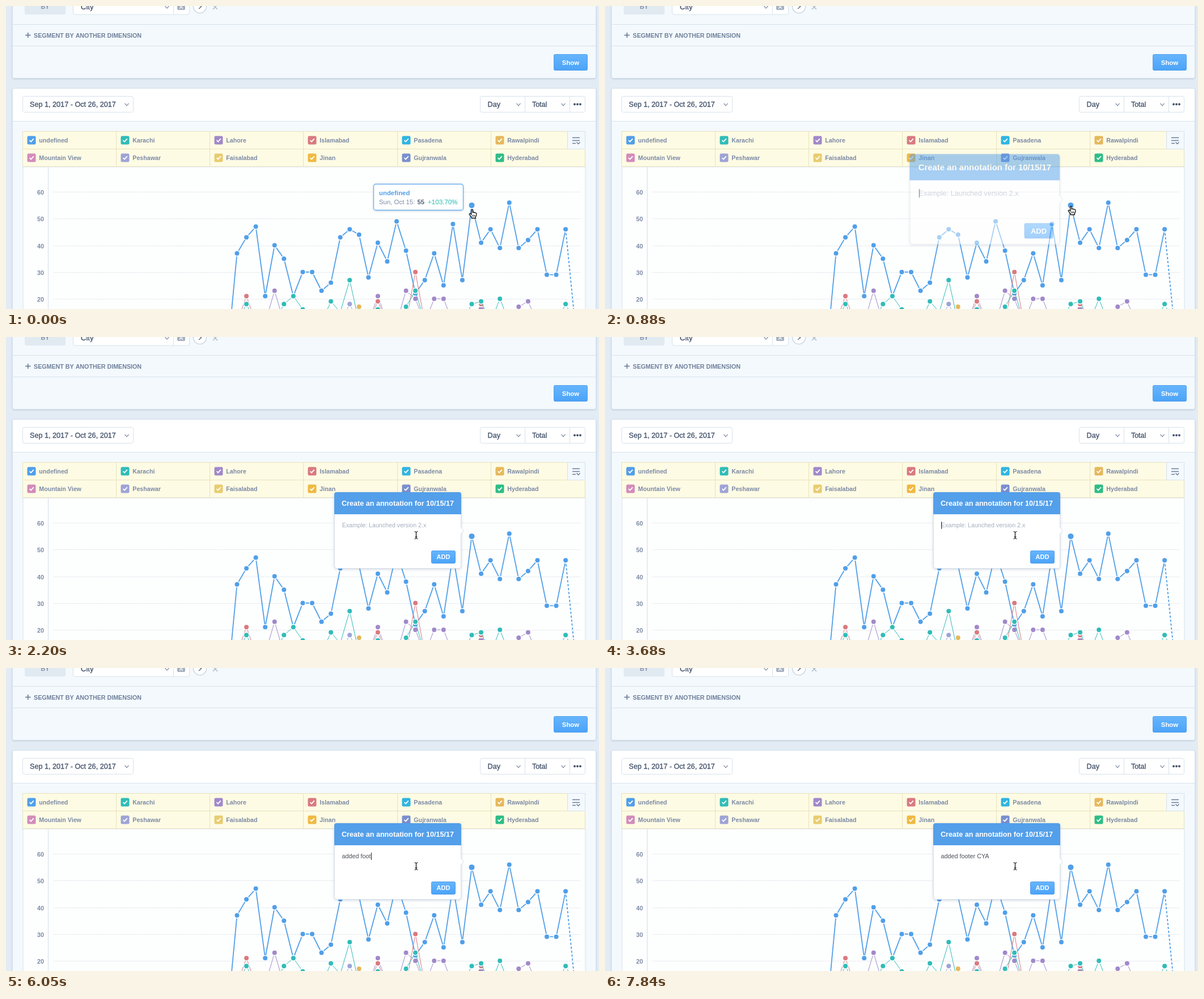
Write an HTML page with a canvas that moves like this. It is 1046x535 px and loops after 7.99 s.

```html
<!DOCTYPE html>
<html lang="en">
<head>
<meta charset="utf-8">
<title>Chart annotation</title>
<style>
html, body { margin: 0; width: 100%; height: 100%; overflow: hidden; background: #e3ecf5; }
canvas { display: block; }
</style>
</head>
<body>
<canvas id="stage" width="1046" height="535"></canvas>
<script>
const stage = document.getElementById('stage');
const layer = stage.cloneNode();
let ctx = stage.getContext('2d');
const LOOP = 7990, TICK = 148;
const BLUE = '#509fe9', INK = '#45546c', MUTED = '#7c8aa5', EDGE = '#d7e2ec', PANEL = '#f3f9fd';

function text(str, x, y, size, color, weight = 700, align = 'left') {
  ctx.font = `${weight === 700 ? 700 : 400} ${size}px "Liberation Sans", Arial, sans-serif`;
  ctx.textAlign = align;
  ctx.fillStyle = color;
  ctx.fillText(str, x, y);
  if (weight === 500) {
    ctx.strokeStyle = color;
    ctx.lineWidth = 0.35;
    ctx.strokeText(str, x, y);
  }
  return ctx.measureText(str).width;
}

function line(points, color, width = 1, dash = []) {
  ctx.beginPath();
  points.forEach(([x, y]) => ctx.lineTo(x, y));
  ctx.strokeStyle = color;
  ctx.lineWidth = width;
  ctx.setLineDash(dash);
  ctx.stroke();
  ctx.setLineDash([]);
}

function box(x, y, w, h, fill, border, radius = 0, shadow = 0, borderWidth = 1) {
  ctx.beginPath();
  ctx.roundRect(x, y, w, h, radius);
  ctx.save();
  if (shadow) {
    ctx.shadowColor = 'rgba(60,90,130,.3)';
    ctx.shadowBlur = shadow;
    ctx.shadowOffsetY = 1;
  }
  ctx.fillStyle = fill;
  ctx.fill();
  ctx.restore();
  if (border) {
    ctx.strokeStyle = border;
    ctx.lineWidth = borderWidth;
    ctx.stroke();
  }
}

function disc(x, y, r, fill, border, width = 1) {
  ctx.beginPath();
  ctx.arc(x, y, r, 0, 7);
  if (border) {
    ctx.strokeStyle = border;
    ctx.lineWidth = width;
    ctx.stroke();
  }
  ctx.fillStyle = fill;
  ctx.fill();
}

const chevron = (x, y) => line([[x - 3.5, y - 2], [x, y + 2], [x + 3.5, y - 2]], '#8a97aa', 1.3);

function button(x, y, w, h, label, size) {
  const g = ctx.createLinearGradient(0, y, 0, y + h);
  g.addColorStop(0, '#66b5fd');
  g.addColorStop(1, '#4ba3f8');
  box(x, y, w, h, g, '#519fea', 2);
  text(label, x + w / 2, y + h / 2 + size * 0.36, size, '#fff', 700, 'center');
}

function drawQuery() {
  box(11.5, -10, 1029, 137.5, PANEL, EDGE, 3, 3);
  line([[12, 32.5], [1040, 32.5]], EDGE);
  line([[12, 70.5], [1040, 70.5]], EDGE);
  box(33, -10, 72, 25, '#e1e9f1', null, 3);
  text('BY', 69, 5, 10.7, '#8291aa', 700, 'center');
  box(118.5, -10, 205, 25, '#fff', EDGE, 3);
  line([[295.5, 0], [295.5, 15]], EDGE);
  text('City', 132, 5.5, 13, INK, 500);
  chevron(284, 2);
  box(302, -6, 14, 13, '#a5b0c0', null, 2);
  text('A', 309, 5, 9.5, '#fff', 700, 'center');
  disc(342, 1, 11, '#fff', '#bac7d6', 2);
  line([[340, -3], [344.5, 1], [340, 5]], '#62718a', 1.5);
  line([[365, -2], [373, 6]], '#b3bdca', 1.6);
  line([[373, -2], [365, 6]], '#b3bdca', 1.6);
  line([[34, 51.5], [43.5, 51.5]], '#6f7f9a', 1.7);
  line([[38.75, 47], [38.75, 56]], '#6f7f9a', 1.7);
  text('SEGMENT BY ANOTHER DIMENSION', 49, 55.5, 10.7, '#6f7f9a');
  button(966.5, 85.5, 59, 28, 'Show', 11.4);
}

const LEGEND = [
  ['undefined', '#509fe9'], ['Karachi', '#30bcb8'], ['Lahore', '#a189ca'],
  ['Islamabad', '#d97a80'], ['Pasadena', '#2fb5e2'], ['Rawalpindi', '#e6b85c'],
  ['Mountain View', '#d38cba'], ['Peshawar', '#9ea3d6'], ['Faisalabad', '#e8cc70'],
  ['Jinan', '#f0b942'], ['Gujranwala', '#7a8fd0'], ['Hyderabad', '#2ebd86']
];

function drawReport() {
  box(11.5, 145.5, 1029, 420, PANEL, EDGE, 3, 3);
  box(12, 146, 1028, 57, '#fff', null, 3);
  line([[12, 203.5], [1040, 203.5]], EDGE);
  box(29.5, 159.5, 195, 28, '#fff', EDGE, 3);
  text('Sep 1, 2017 - Oct 26, 2017', 42, 178, 12.65, INK, 500);
  chevron(213, 174);
  box(836.5, 159.5, 185, 28, '#fff', EDGE, 3);
  line([[915.5, 160], [915.5, 187]], EDGE);
  line([[994.5, 160], [994.5, 187]], EDGE);
  text('Day', 849.5, 178, 12.65, INK, 500);
  text('Total', 928, 178, 12.4, INK, 500);
  chevron(904, 174);
  chevron(983, 174);
  for (let i = 0; i < 3; i++) disc(1003 + 5 * i, 173.5, 2, INK);

  box(30, 284, 992, 260, '#fdfefe', EDGE);
  const rule = '#e6e1bd';
  box(29.5, 221.5, 992, 62, '#fefbe4', rule);
  line([[30, 252.5], [1021, 252.5]], rule);
  LEGEND.forEach(([name, color], i) => {
    const x = Math.round(29.7 + 165.2 * (i % 6)), y = i < 6 ? 237 : 268;
    if (i % 6) line([[x - 0.5, y - 15], [x - 0.5, y + 15]], rule);
    box(x + 7.5, y - 7.5, 15, 15, color, null, 2.5);
    line([[x + 11.5, y], [x + 14, y + 2.7], [x + 18.8, y - 2.7]], '#fff', 1.8);
    text(name, x + 28.3, y + 4, 10.7, MUTED);
  });
  box(990.5, 221.5, 31, 31, PANEL, EDGE);
  for (let i = 0; i < 3; i++) line([[999, 232.5 + 5 * i], [i < 2 ? 1012 : 1005, 232.5 + 5 * i]], '#6b7a94', 1.5);
  line([[1006.5, 240.5], [1009.5, 243.5], [1012.5, 240.5]], '#6b7a94', 1.5);
}

const px = day => 407.5 + 16.56 * day;
const py = value => 611.2 - 4.715 * value;
const PEAK = 25, DAYS = 36, UNSEEN = 11;
const VISITS = [37, 43, 47, 21, 40, 35, 21, 30, 30, 23, 26, 43, 46, 44, 28, 41, 34, 49,
  38, 22, 27, 37, 25, 48, 27, 55, 41, 46, 39, 56, 39, 42, 46, 29, 29, 46];
// Minor cities need only the days that rise into view.
const MINOR = [
  ['#e6b85c', { 13: 17 }],
  ['#9ea3d6', { 12: 18 }],
  ['#a189ca', { 4: 23, 15: 21, 18: 23, 19: 20, 21: 20, 22: 20, 26: 16, 30: 17, 31: 19 }],
  ['#d97a80', { 1: 21, 15: 19, 19: 30, 26: 18 }],
  ['#30bcb8', { 1: 18, 5: 18, 6: 21, 7: 16, 10: 19, 11: 15, 12: 27, 15: 16, 18: 17, 19: 23,
    25: 18, 26: 19, 28: 20, 35: 18 }]
];

function drawSeries(color, values, width, before) {
  const points = Array.from({ length: DAYS }, (_, day) => [px(day), py(values[day] ?? UNSEEN)]);
  line([[px(-1), py(before)], ...points], color, width);
  line([points[DAYS - 1], [px(DAYS), py(UNSEEN)]], color, width, [4, 3]);
  points.forEach(([x, y], day) => {
    if (y < 545) disc(x, y, values === VISITS && day === PEAK ? 5 : 4, color, '#fff', 3);
  });
}

function drawChart() {
  line([[74.5, 284], [74.5, 535]], '#d3deea');
  for (let v = 20; v <= 60; v += 10) {
    const y = Math.round(py(v)) + 0.5;
    line([[84, y], [1013, y]], '#dfe4ea', 1, [2, 1]);
    text(v, 67, y + 4.5, 10.7, MUTED, 700, 'right');
  }
  drawSeries(BLUE, VISITS, 1.8, 0);
  MINOR.forEach(([color, values]) => drawSeries(color, values, 1, UNSEEN));
}

function drawTooltip() {
  box(648.5, 314.5, 158, 46, '#fff', '#6bb0ee', 4, 4, 1.3);
  text('undefined', 658, 333.5, 11.4, BLUE);
  text('Sun, Oct 15:', 658, 350, 11.4, MUTED, 400);
  text('55', 725.5, 350, 11.4, '#56647c');
  text('+103.70%', 744, 350, 11.6, '#5ccbc3', 500);
}

// Paints on a separate layer, so that the popup fades as one piece.
function drawPopup(typed, caret, scale, opacity) {
  const page = ctx;
  ctx = layer.getContext('2d');
  ctx.clearRect(0, 0, 1046, 535);
  ctx.save();
  ctx.translate(807, 342);
  ctx.scale(scale, scale);
  ctx.translate(-807, -342);
  box(579.5, 274.5, 223, 134, '#fff', '#d8e1ea', 4, 5);
  ctx.beginPath();
  ctx.moveTo(802, 336);
  ctx.lineTo(807.5, 342);
  ctx.lineTo(802, 348);
  ctx.fillStyle = '#fff';
  ctx.fill();
  line([[803, 336.5], [807.5, 342], [803, 347.5]], '#d8e1ea');
  box(579, 274, 224, 39, '#539fea', null, [4, 4, 0, 0]);
  text('Create an annotation for 10/15/17', 592, 298, 12.6, '#fff');
  button(750.5, 377.5, 42, 22, 'ADD', 11);
  let end = 0;
  if (typed) end = text(typed, 592.5, 336, 10.8, '#4a4f57', 400);
  else text('Example: Launched version 2.x', 592.8, 336, 10.65, '#a4aebf', 400);
  if (caret) line([[593.5 + end, 326], [593.5 + end, 339]], '#222');
  ctx.restore();
  ctx = page;
  ctx.globalAlpha = opacity;
  ctx.drawImage(layer, 0, 0);
  ctx.globalAlpha = 1;
}

const HAND = new Path2D('M-2.2 1.5V-5.2Q-2.2-6.5-1-6.5T.2-5.2V-1.6Q1.4-2.6 2.6-1.3Q3.8-2 4.8-.7Q6.8-1.2 6.8 1V3.6L5.4 6.3V8.5H-1.8V6.8L-5.4 2.6Q-6.3 1-5.2.5T-2.2 2.2Z');

function drawHand(x, y) {
  ctx.save();
  ctx.translate(x, y);
  ctx.fillStyle = '#fff';
  ctx.strokeStyle = '#111';
  ctx.lineWidth = 1.3;
  ctx.fill(HAND);
  ctx.stroke(HAND);
  for (let i = 0; i < 3; i++) line([[2 * i, 2.8], [2 * i, 6]], '#111', 0.9);
  ctx.restore();
}

function drawBeam(x, y) {
  for (const [color, width] of [['#fff', 2.6], ['#222', 1.2]]) {
    for (const side of [-1, 1]) {
      line([[x + 3 * side, y - 6.5], [x + side, y - 6], [x, y - 5],
        [x, y + 5], [x + side, y + 6], [x + 3 * side, y + 6.5]], color, width);
    }
    line([[x - 2, y + 3], [x + 2, y + 3]], color, width);
  }
}

const NOTE = 'added footer CYA';

// Two letters every three ticks; a space comes along with the letter before it.
function typedNote(tick) {
  if (tick < 29) return '';
  const count = Math.round(2 + (tick - 29) * 2 / 3);
  return NOTE.slice(0, NOTE[count] === ' ' ? count + 1 : count);
}

// The caret blinks, stays lit while typing, and goes out after the pause.
function caretLit(tick) {
  if (tick >= 28) return tick < 53;
  return Math.floor((tick - 8.5) / 3.2) % 2 !== 0;
}

function drawPointer(tick) {
  if (tick < 9) return drawHand(823, Math.max(360, 366 - 3 * tick));
  const ease = 1 - (1 - Math.min(1, (tick - 8) / 4)) ** 2;
  drawBeam(823 - 99.5 * ease, 360 - 10 * ease);
}

function draw(time) {
  const tick = Math.floor((time + 27) / TICK);
  ctx.fillStyle = '#e3ecf5';
  ctx.fillRect(0, 0, 1046, 535);
  drawQuery();
  drawReport();
  drawChart();
  if (tick < 5) drawTooltip();
  if (tick === 6) drawPopup('', true, 1.183, 0.5);
  if (tick > 6) drawPopup(typedNote(tick), caretLit(tick), 1, 1);
  drawPointer(tick);
}

const origin = performance.now();
function animate() {
  draw((performance.now() - origin) % LOOP);
  requestAnimationFrame(animate);
}
animate();
</script>
</body>
</html>
```
